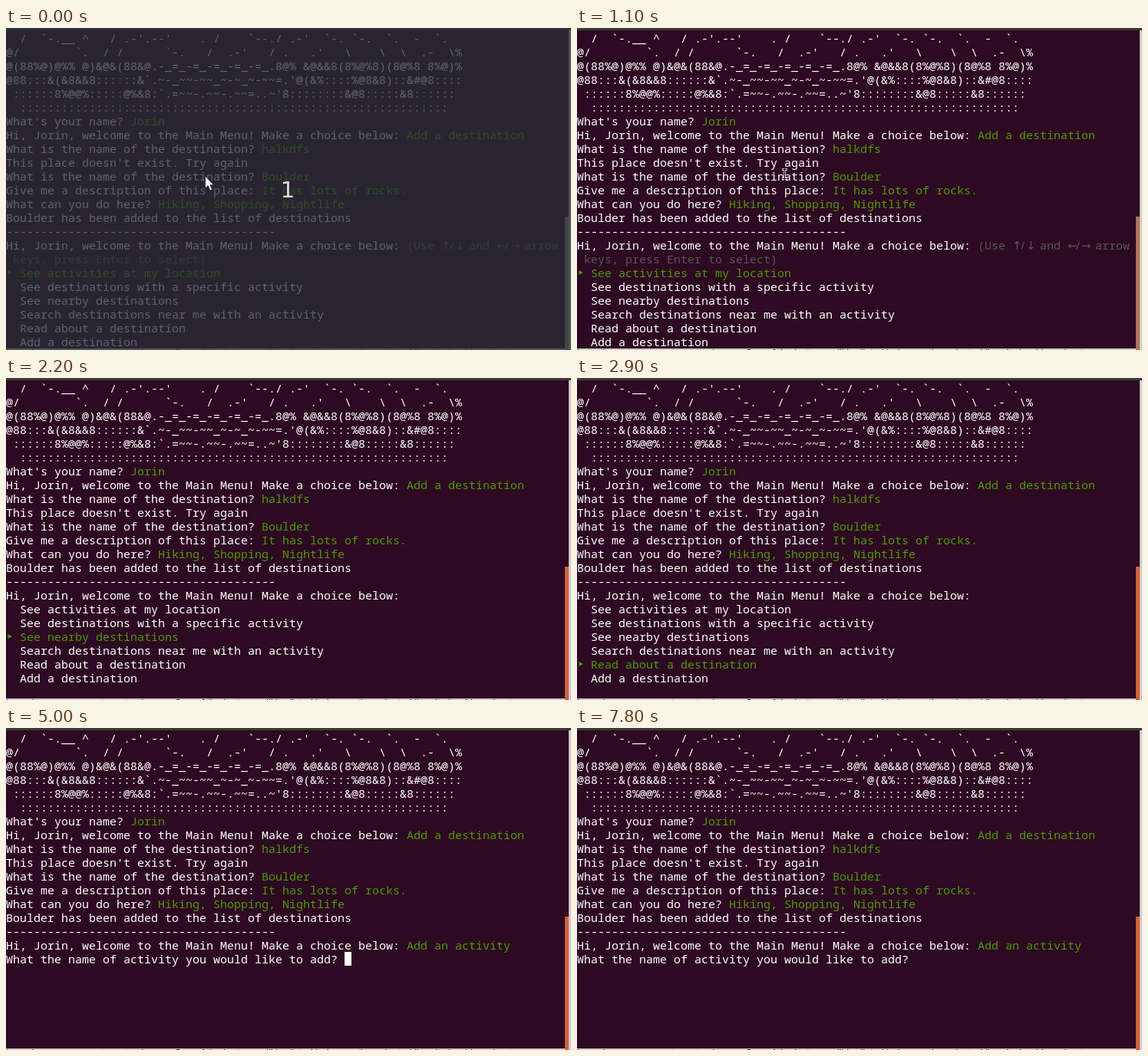
Write an HTML page that moves like this. It is 736 px wide and 420 px high and loops after 8 s.

```html
<!DOCTYPE html>
<html lang="en">
<head>
<meta charset="utf-8">
<title>Terminal menu</title>
<style>
html, body { margin: 0; width: 100%; height: 100%; overflow: hidden; background: #2d0922; }
svg { display: block; }
text { white-space: pre; font: 15px "Noto Sans Mono", "DejaVu Sans Mono", monospace; }
.arrow { font: 15px "DejaVu Sans", sans-serif; }
.count { font: 29px "DejaVu Sans", sans-serif; }
.page { font: 13px "Liberation Sans", sans-serif; }
</style>
</head>
<body>
<svg id="stage" width="736" height="420" viewBox="0 0 736 420">
  <rect width="736" height="420" fill="#2d0922"/>
  <rect width="736" height="3" fill="#3c3b37"/>
  <rect x="733" y="3" width="3" height="417" fill="#cfcbc8"/>
  <rect y="418" width="733" height="2" fill="#cfcbc8"/>
  <text class="page" x="0" y="428" fill="#222">I need a menu prompt you to choose. One of the buttons will be listed below as the selected line, it should read out.</text>
  <rect id="thumb" x="728" y="246" width="5" height="174"/>
  <g id="log"></g>
  <g id="hint"></g>
  <g id="menu"></g>
  <path id="pointer" d="M2.5 -4 L8 -1 L2.5 2 Z" fill="#4e9a06"/>
  <g id="answer"></g>
  <rect id="caret" x="441" y="292" width="9" height="18" fill="#fff"/>
  <g id="beam" fill="none">
    <path d="M267 184.5 h3 m1 0 h3 M270.5 184 v13 M267 196.5 h3 m1 0 h3" stroke="#fff" stroke-width="2.4"/>
    <path d="M267.5 184.5 h6 M270.5 185 v11 M267.5 196.5 h6" stroke="#111" stroke-width="1"/>
  </g>
  <g id="countdown">
    <rect width="736" height="420" fill="#282f35" opacity=".75"/>
    <text class="count" x="367" y="221" text-anchor="middle" fill="#dcdcdc">1</text>
    <path d="M259.5 193 V209 L263.2 205.6 L266 212 L268.6 210.8 L265.9 204.7 H270.5 Z" fill="#fff" stroke="#222" stroke-width=".8"/>
  </g>
</svg>
<script>
const LOOP = 8000, COL = 9, ROW = 18;
const WHITE = "#fff", GREEN = "#4e9a06", GRAY = "#555753";
const $ = id => document.getElementById(id);
const rowY = row => 14 + ROW * row;

function write(parent, row, col, str, fill = WHITE, cls = "") {
  const el = document.createElementNS("http://www.w3.org/2000/svg", "text");
  el.setAttribute("x", col * COL);
  el.setAttribute("y", rowY(row) + 5);
  el.setAttribute("fill", fill);
  if (cls) el.setAttribute("class", cls);
  el.textContent = str;
  parent.appendChild(el);
  return el;
}

const art = [
  "  /  `-.__ ^   / .-'.--'    . /    `--./ .-'  `-. `-.  `.  -  `.",
  "@/        `.  / /      `-.   /  .-'   / .   .'   \\    \\  \\  .-  \\%",
  "@(88%@)@%% @)&@&(88&@.-_=_-=_-=_-=_-=_.8@% &@&&8(8%@%8)(8@%8 8%@)%",
  "@88:::&(&8&&8::::::&`.~-_~~-~~_~-~_~-~~=.'@(&%::::%@8&8)::&#@8::::",
  " ::::::8%@@%:::::@%&8:`.=~~-.~~-.~~=..~'8::::::::&@8:::::&8::::::",
  "  " + ":".repeat(62)
];
const greeting = "Hi, Jorin, welcome to the Main Menu! Make a choice below: ";
const dialog = [
  ["What's your name? ", "Jorin"],
  [greeting, "Add a destination"],
  ["What is the name of the destination? ", "halkdfs"],
  ["This place doesn't exist. Try again"],
  ["What is the name of the destination? ", "Boulder"],
  ["Give me a description of this place: ", "It has lots of rocks."],
  ["What can you do here? ", "Hiking, Shopping, Nightlife"],
  ["Boulder has been added to the list of destinations"],
  ["-".repeat(39)],
  [greeting]
];
const choices = [
  "See activities at my location",
  "See destinations with a specific activity",
  "See nearby destinations",
  "Search destinations near me with an activity",
  "Read about a destination",
  "Add a destination",
  "Add an activity",
  "Update destination description"
];

art.forEach((line, i) => write($("log"), i, 0, line));
dialog.forEach(([ask, reply], i) => {
  const row = art.length + i;
  write($("log"), row, 0, ask);
  if (reply) write($("log"), row, ask.length, reply, GREEN);
});

for (const [col, str] of [[58, "(Use"], [64, "/"], [67, "and"], [72, "/"], [75, "arrow"]])
  write($("hint"), 15, col, str, GRAY);
for (const [col, str] of [[63, "↑"], [65, "↓"], [71, "←"], [73, "→"]])
  write($("hint"), 15, col, str, GRAY, "arrow");
write($("hint"), 16, 1, "keys, press Enter to select)", GRAY);

const items = Array.from({ length: 6 }, (_, i) => write($("menu"), 16 + i, 2, ""));
write($("answer"), 15, greeting.length, "Add an activity", GREEN);
write($("answer"), 16, 0, "What the name of activity you would like to add?");

// Start time, first visible choice, selected choice
const moves = [[0, 0, 0], [2000, 0, 1], [2200, 0, 2], [2900, 0, 4], [3500, 1, 5], [3700, 2, 6]];
const show = (id, on) => $(id).setAttribute("visibility", on ? "visible" : "hidden");

function draw(t) {
  const fresh = t < 2000, open = t < 5000;
  const [, first, selected] = moves.filter(m => t >= m[0]).pop();
  const top = fresh ? 17 : 16;

  items.forEach((el, i) => {
    el.textContent = choices[first + i];
    el.setAttribute("y", rowY(top + i) + 5);
    el.setAttribute("fill", first + i === selected ? GREEN : WHITE);
  });
  $("pointer").setAttribute("transform", `translate(0 ${rowY(top + selected - first)})`);

  show("hint", fresh);
  show("menu", open);
  show("pointer", open);
  show("answer", !open);
  show("caret", !open && (t < 5400 || Math.floor((t - 5400) / 600) % 2 === 1));
  show("beam", t >= 100 && t < 1800);
  show("countdown", t < 100);
  $("thumb").setAttribute("fill", t < 1100 ? "#8d8783" : t < 1200 ? "#b0745b" : "#d0633a");
}

function tick() {
  draw(performance.now() % LOOP);
  requestAnimationFrame(tick);
}
tick();
</script>
</body>
</html>
```
